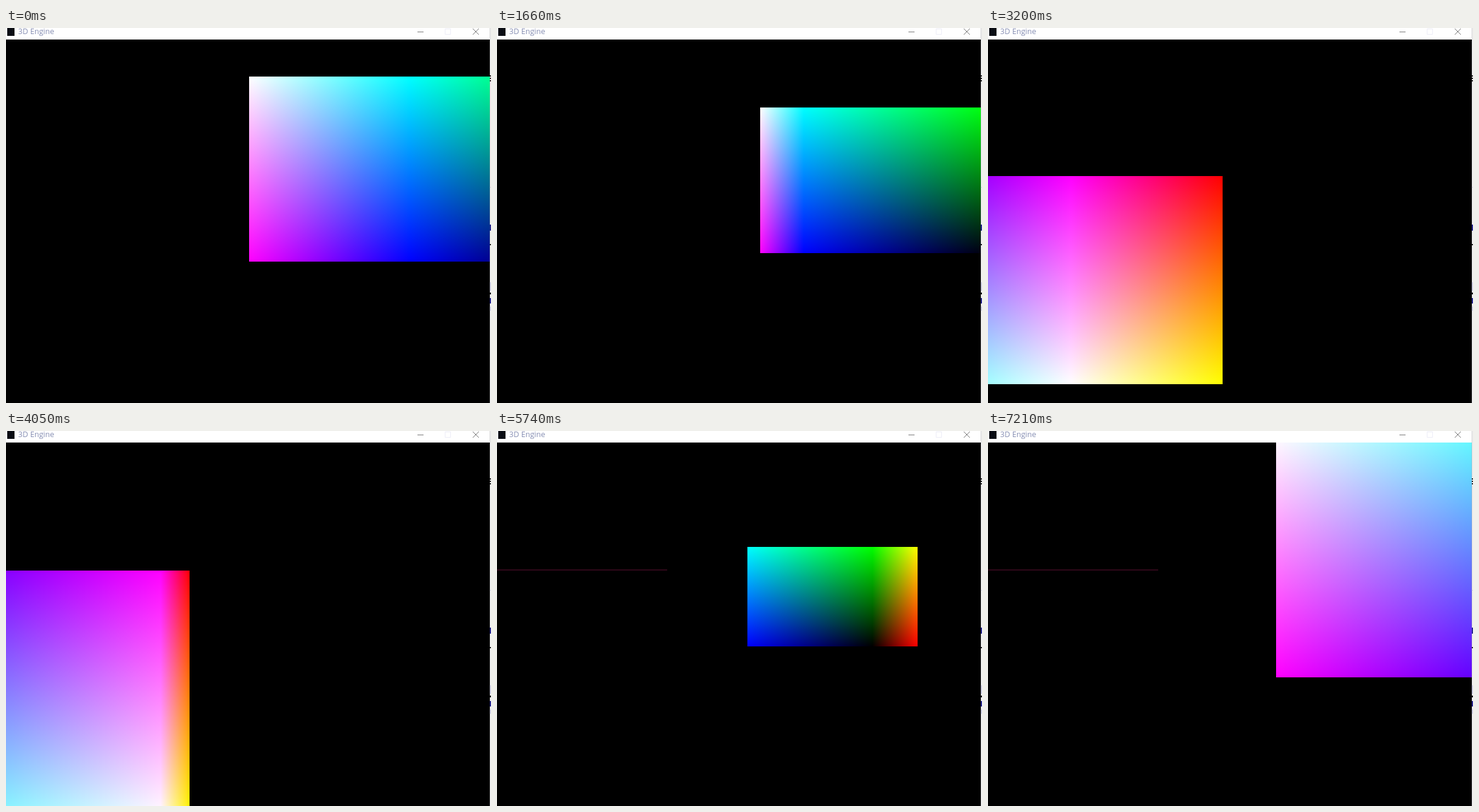
Animation, 798 px wide and 618 px high, one loop 7.29 s. Source, as an HTML page with a canvas:

```html
<!DOCTYPE html>
<html lang="en">
<head>
<meta charset="utf-8">
<title>3D Engine</title>
<style>
  html, body { margin: 0; width: 100%; height: 100%; overflow: hidden; background: #000; }
  canvas, svg { position: absolute; left: 0; top: 0; display: block; }
  text { font: 12.6px "Open Sans", "Noto Sans", sans-serif; fill: #8890b4; }
</style>
</head>
<body>
<canvas id="view" width="798" height="618"></canvas>
<svg width="798" height="618" viewBox="0 0 798 618">
  <rect width="798" height="19" fill="#fff"/>
  <rect x="2" y="0" width="12" height="13" fill="#0a0d14"/>
  <text x="20" y="10">3D Engine</text>
  <g fill="none" stroke-width="1">
    <path d="M677 6.5h10" stroke="#777"/>
    <path d="M722.5 1.5h9v9h-9z" stroke="#ececf6"/>
    <path d="M768 1l10 10M778 1l-10 10" stroke="#777"/>
  </g>
  <!-- sliver of the desktop beside the window -->
  <rect x="796" width="1" height="618" fill="#c4c4c4"/>
  <rect x="797" width="1" height="618" fill="#fff"/>
  <path d="M797 78v2m0 2v2m0 2v2M797 356v2M797 436v3" stroke="#222" stroke-width="2"/>
  <path d="M797 324v10M797 445v9" stroke="#2a2a90" stroke-width="2"/>
  <path d="M797 262v1M797 419v14M797 459v7" stroke="#c8c8dc" stroke-width="2"/>
</svg>
<script>
const ctx = document.getElementById('view').getContext('2d');
const LOOP = 7290;
const VIEW = { x: 0, y: 19, w: 796, h: 599 };
const CENTER = { x: 396, y: 319 };
const SIZE = 420;                    // cube height at full scale
const TOP = 0.7825, BOTTOM = -0.2175; // cube position in units of its height
const AXIS = 0.952, RADIUS = 0.9428;

// Red and blue of the four upright edges; green runs from bottom to top.
const EDGES = ['rgb(255,0,255)', 'rgb(0,0,255)', 'rgb(0,0,0)', 'rgb(255,0,0)'];

// [step, phase in degrees]
const PHASE = [[0, -43.45], [15, 23.5], [33, 104.77], [53, 193.6],
               [64, 243.26], [75, 292.95], [94, 377.63]];

const rad = deg => deg * Math.PI / 180;

function stepAt(t) {
  return t < 740 ? Math.floor((t + 5) / 74.5)
                 : Math.min(94, 10 + Math.floor((t - 730) / 77.02));
}

function phaseAt(step) {
  let i = 1;
  while (i < PHASE.length - 1 && step > PHASE[i][0]) i++;
  const [s0, p0] = PHASE[i - 1], [s1, p1] = PHASE[i];
  return p0 + (p1 - p0) * (step - s0) / (s1 - s0);
}

function gradient(x0, y0, x1, y1, from, to) {
  const g = ctx.createLinearGradient(x0, y0, x1, y1);
  g.addColorStop(0, from);
  g.addColorStop(1, to);
  return g;
}

function drawCube(scale) {
  const size = SIZE * scale;
  const turn = 135 + 180 * scale;
  const top = CENTER.y - size * TOP, bottom = CENTER.y - size * BOTTOM;
  const y0 = Math.round(top), height = Math.round(bottom) - y0;
  const across = k => AXIS + RADIUS * Math.sin(rad(turn + 90 * k));

  for (let k = 0; k < 4; k++) {
    const a = across(k), b = across(k + 1);
    if (b <= a) continue;            // faces away
    const left = CENTER.x + size * a, right = CENTER.x + size * b;
    const x0 = Math.round(left), width = Math.round(right) - x0;
    if (!width || !height) continue;
    ctx.globalCompositeOperation = 'source-over';
    ctx.fillStyle = gradient(left, 0, right, 0, EDGES[k], EDGES[(k + 1) % 4]);
    ctx.fillRect(x0, y0, width, height);
    ctx.globalCompositeOperation = 'lighter';
    ctx.fillStyle = gradient(0, top, 0, bottom, 'rgb(0,255,0)', 'rgb(0,0,0)');
    ctx.fillRect(x0, y0, width, height);
  }
  ctx.globalCompositeOperation = 'source-over';
}

function draw(t) {
  const step = stepAt(t);
  ctx.save();
  ctx.beginPath();
  ctx.rect(VIEW.x, VIEW.y, VIEW.w, VIEW.h);
  ctx.clip();
  ctx.fillStyle = '#000';
  ctx.fillRect(VIEW.x, VIEW.y, VIEW.w, VIEW.h);
  if (step >= 54) {                  // faint line left after the largest pose
    ctx.fillStyle = '#30081a';
    ctx.fillRect(0, 228, 280, 2);
  }
  drawCube(Math.cos(rad(phaseAt(step))));
  ctx.restore();
}

const start = performance.now();
function tick() {
  draw((performance.now() - start) % LOOP);
  requestAnimationFrame(tick);
}
tick();
</script>
</body>
</html>
```
